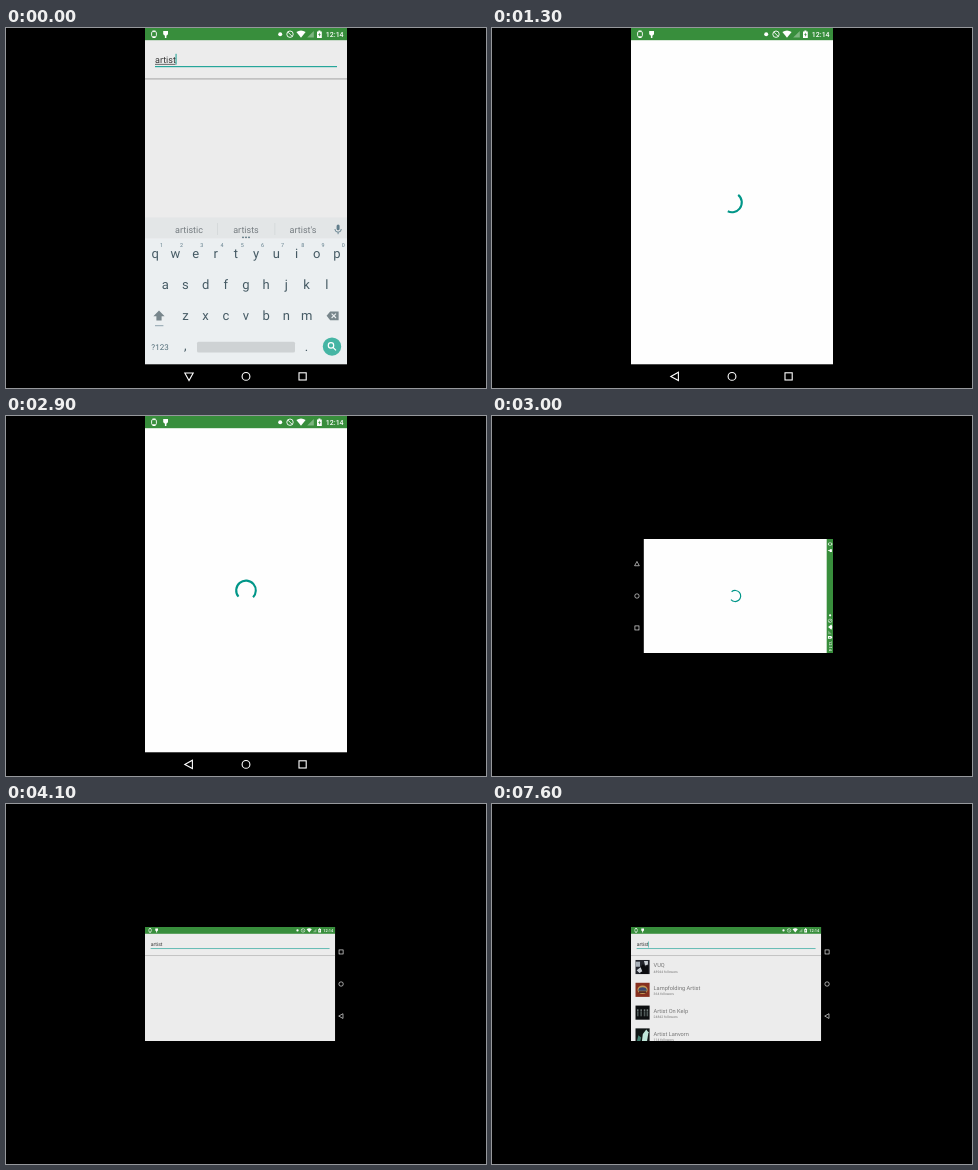
Animation, 480 px wide and 360 px high, one loop 8 s. Source, as an HTML page:

```html
<!DOCTYPE html>
<html lang="en">
<head>
<meta charset="utf-8">
<title>Search and rotate</title>
<style>
  html, body { margin: 0; width: 100%; height: 100%; overflow: hidden; background: #000; }
  svg { display: block; width: 480px; height: 360px; }
  text { font-family: Roboto, "Open Sans", sans-serif; text-rendering: geometricPrecision; }
</style>
</head>
<body>
<svg viewBox="0 0 480 360">
  <defs>
    <clipPath id="wide"><rect x="139" y="123" width="202" height="114"/></clipPath>
    <clipPath id="page"><rect width="337" height="203"/></clipPath>
    <g id="left" fill="#fff">
      <path d="M7.5 2.4h3v1.2h-3zM7.5 8.8h3V10h-3z"/>
      <rect x="6.6" y="3.6" width="4.8" height="5.2" rx="1.2" fill="none" stroke="#fff" stroke-width=".9"/>
      <path d="M18.2 3h4.8v3.2l-1.6 1.5v2.3h-1.5V7.7l-1.7-1.5z"/>
    </g>
    <g id="right" fill="#fff">
      <circle cx="-66.8" cy="6.2" r="2"/>
      <g fill="none" stroke="#fff" stroke-width=".9"><circle cx="-57" cy="6.2" r="3.2"/><path d="M-59.2 4l4.4 4.4"/></g>
      <path d="M-50.6 4Q-46 .9-41.4 4L-46 9.8z"/>
      <path d="M-39.8 9.6L-33.2 3v6.6z" opacity=".35"/>
      <path d="M-28.6 2.6h2v1h1.4V10h-4.8V3.6h1.4z"/>
      <path d="M-27.3 4.6l-1.5 2.4h1v1.8l1.6-2.5h-1.1z" fill="#388e3c"/>
      <text x="-3.4" y="8.8" font-size="7" font-weight="500" text-anchor="end">12:14</text>
    </g>
    <path id="back" d="M-4.2 0L3.4-4.2V4.2z" fill="none" stroke="#fff" stroke-width="1.1"/>
    <circle id="home" r="3.9" fill="none" stroke="#fff" stroke-width="1.1"/>
    <rect id="apps" x="-3.6" y="-3.6" width="7.2" height="7.2" fill="none" stroke="#fff" stroke-width="1.1"/>
  </defs>
  <g clip-path="url(#wide)"><g id="landscape"></g></g>
  <g id="clip"><g id="portrait"></g></g>
</svg>
<script>
const $ = id => document.getElementById(id);
const SCALE = 0.5644;
const clamp = v => Math.max(0, Math.min(1, v));

const rect = (x, y, w, h, fill, more = '') =>
  `<rect x="${x}" y="${y}" width="${w}" height="${h}" fill="${fill}" ${more}/>`;
const text = (x, y, size, fill, str, more = '') =>
  `<text x="${x}" y="${y}" font-size="${size}" fill="${fill}" ${more}>${str}</text>`;
const mid = (x, y, size, fill, str) => text(x, y, size, fill, str, 'text-anchor="middle"');
const icon = (name, x, y, turn = 0, id = '') =>
  `<use id="${id}" href="#${name}" transform="translate(${x} ${y}) rotate(${turn})"/>`;

const status = w => rect(0, 0, w, 12.2, '#388e3c') + icon('left', 0, 0) + icon('right', w, 0);

const field = (w, cursor) =>
  text(10, 34.6, 9, '#333', 'artist') +
  rect(30.6, 25.8, .9, 10.8, '#009688', `id="${cursor}"`) +
  rect(10, 38, w - 20, 1.2, '#26a69a') +
  rect(0, 50.2, w, 1.4, '#b9b9b9');

function keyboard() {
  const ink = '#455a64', step = 20.2;
  const row = (keys, x, y) => [...keys].map((k, i) => mid(x + i * step, y, 13, ink, k)).join('');
  let s = rect(0, 189.5, 202, 21, '#e3e6e7') + rect(0, 210.5, 202, 126, '#ebeff1');
  ['artistic', 'artists', "artist's"].forEach((w, i) => s += mid(44 + i * 57, 204.6, 9, '#757c80', w));
  s += rect(72.3, 195, .6, 12, '#cdd2d4') + rect(129.6, 195, .6, 12, '#cdd2d4');
  for (let i = -1; i < 2; i++) s += `<circle cx="${101 + i * 3}" cy="209.3" r=".9" fill="#546e7a"/>`;
  // microphone
  s += rect(191.6, 196.6, 3, 5.6, '#607d8b', 'rx="1.5"') +
    '<path d="M189.9 201a3.2 3.2 0 0 0 6.4 0M193.1 204.2v2" fill="none" stroke="#607d8b" stroke-width=".9"/>';
  s += row('qwertyuiop', 10.2, 230.4) + row('asdfghjkl', 20.2, 261.4) + row('zxcvbnm', 40.4, 292.4);
  [...'1234567890'].forEach((n, i) => s += mid(16.4 + i * step, 219.4, 5.4, '#607d8b', n));
  // shift and backspace
  s += '<path d="M14 282.6l5.6 5.6h-3v4.2h-5.2v-4.2h-3z" fill="#78868c"/>' + rect(10, 297.2, 8.4, 1, '#90a4ae') +
    '<path d="M181.6 287.8l3.6-4.4h8.4v8.8h-8.4z" fill="#78868c"/>' +
    '<path d="M186.6 285.6l4.4 4.4m0-4.4l-4.4 4.4" stroke="#ebeff1" stroke-width="1.1"/>';
  s += mid(15, 321.6, 8, '#546e7a', '?123') + mid(40.4, 322, 13, ink, ',') + mid(161.4, 322.6, 13, ink, '.') +
    rect(52, 313.8, 98, 10.6, '#ced2d4', 'rx="1.5"');
  return s + '<circle id="key" cx="187" cy="318.6" r="9.2" fill="#45b5a4"/>' +
    '<g fill="none" stroke="#fff" stroke-width="1.2"><circle cx="186" cy="317.4" r="2.7"/><path d="M188 319.4l3 3"/></g>';
}

$('portrait').innerHTML = `<g transform="translate(139)">` +
  rect(0, 0, 202, 360, '#ececec') + field(202, 'caret1') +
  rect(10, 35.9, 20.4, .7, '#333') +
  `<g id="keys">${keyboard()}</g>` +
  `<g id="loading">${rect(0, 12, 202, 324.4, '#fefefe')}
    <circle id="spin" cx="101" cy="174.4" r="9.8" pathLength="360" fill="none" stroke="#009688" stroke-width="2.1"/></g>` +
  status(202) + rect(0, 336.3, 202, 23.7, '#000') +
  icon('back', 44, 348.4, 0, 'navBack') + icon('home', 101, 348.4) + icon('apps', 157.6, 348.4) + '</g>';

// Flat cover art on a 25-unit square
const covers = [
  rect(0, 0, 25, 25, '#22242c') + rect(0, 3, 8, 9, '#a9b0b8') + '<path d="M9 25V13l4-6 5 5 5-3v16z" fill="#0b0c10"/>' +
    '<path d="M2 18l7-5 3 7-5 3zM15 2h7v6l-5 2z" fill="#c9ced4"/>',
  rect(0, 0, 25, 25, '#87301f') + '<ellipse cx="12.5" cy="12.5" rx="9" ry="7.5" fill="#c29a55"/>' +
    '<path d="M5 14a7.5 6 0 0 1 15 0z" fill="#39466f"/>' + rect(6, 15, 13, 3, '#4b2320'),
  rect(0, 0, 25, 25, '#0d0f10') + [4, 10, 16, 21].map(x =>
    `<circle cx="${x}" cy="8" r="1.6" fill="#7e8987"/>` + rect(x - 1.4, 10, 2.8, 9, '#4e5957')).join(''),
  rect(0, 0, 25, 25, '#101615') + '<path d="M11 25l2-15 6-8 4 5-3 18z" fill="#bfe6d9"/>' +
    '<path d="M2 25l3-13 5 4-2 9z" fill="#437f70"/>'
];
const rows = [['VUQ', 48944], ['Lampfolding Artist', 364], ['Artist On Kelp', 24842], ['Artist Lanvorn', 114]];
const list = rows.map(([name, fans], i) => `<g transform="translate(0 ${i * 40.4})">
  <g transform="translate(8 58.6)">${covers[i]}</g>
  ${text(40, 71.6, 10, '#777', name)}${text(40, 80.8, 6, '#777', fans + ' followers')}</g>`).join('');

$('landscape').innerHTML = `<g transform="translate(139 122.9) scale(${SCALE})">` +
  rect(0, 0, 358, 203, '#000') + `<g clip-path="url(#page)">` +
  rect(0, 0, 337, 203, '#ececec') + field(337, 'caret2') + `<g id="list">${list}</g>` + status(337) + '</g>' +
  icon('apps', 347.4, 44.4) + icon('home', 347.4, 101.2) + icon('back', 347.4, 158) + '</g>';

const show = (id, on) => $(id).setAttribute('visibility', on ? 'visible' : 'hidden');
const set = (id, name, value) => $(id).setAttribute(name, value);

// Cubic curve through x controls .4 and .2, y controls 0 and 1
function ease(x) {
  let lo = 0, hi = 1;
  for (let i = 0; i < 24; i++) {
    const s = (lo + hi) / 2, r = 1 - s;
    if (1.2 * s * r * r + .6 * s * s * r + s * s * s < x) lo = s; else hi = s;
  }
  return lo * lo * (3 - 2 * lo);
}

function spinner(t) {
  const age = Math.max(0, t - 1033), p = age / 1333 % 1;
  const start = 270 * ease(clamp(2 * p - 1)), end = 270 * ease(clamp(2 * p));
  const angle = -97.6 + 90 * p + age * 720 / 6665 + start;
  set('spin', 'transform', `rotate(${angle} 101 174.4)`);
  set('spin', 'stroke-dasharray', `${Math.max(1, end - start)} 360`);
}

function draw(ms) {
  const t = Math.floor(ms / 100) * 100;

  // Search, then the loading page
  show('caret1', t < 200 || t >= 700);
  set('key', 'fill', t >= 900 ? '#2b9485' : '#45b5a4');
  const leave = clamp((t - 900) / 300);
  set('keys', 'transform', `translate(0 ${leave * leave * 147})`);
  set('keys', 'opacity', 1 - leave);
  set('loading', 'opacity', clamp((t - 900) / 200));
  set('navBack', 'transform', `translate(44 348.4) rotate(${t < 1000 ? -90 : 0})`);
  spinner(Math.min(t, 2900));

  // Turn to landscape
  const u = clamp((t - 3200) / 400), turn = 90 * (1 - u) ** 3;
  const pose = scale => `translate(240 180) rotate(${turn}) scale(${scale}) translate(-240 -180)`;
  set('portrait', 'transform', t < 3000 ? '' : pose(SCALE));
  set('portrait', 'opacity', 1 - u);
  set('clip', 'clip-path', t < 3000 ? 'none' : 'url(#wide)');
  set('landscape', 'transform', pose(1));
  set('landscape', 'opacity', t > 3200 ? 1 : 0);

  // Results
  set('list', 'opacity', t >= 6000 ? 1 : 0);
  const off = [[4100, 4600], [5100, 5600], [6200, 6600], [7200, 7600]].some(([a, b]) => t >= a && t < b);
  show('caret2', !off);
}

const begin = performance.now();
function tick() {
  draw((performance.now() - begin) % 8000);
  requestAnimationFrame(tick);
}
tick();
</script>
</body>
</html>
```
